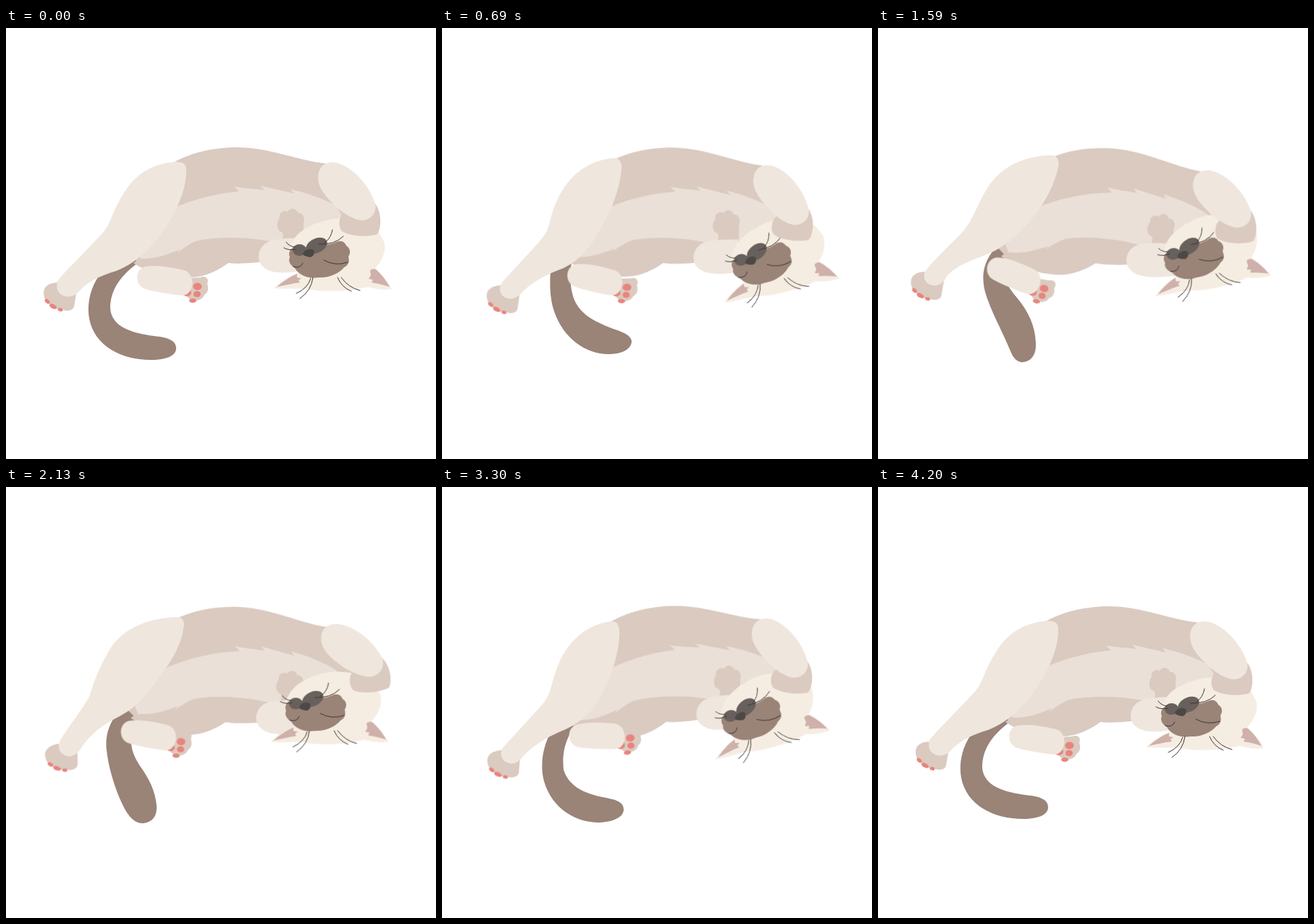
Animation of 594 by 596 pixels, one loop 4230 ms. Source, as an HTML page without scripts:

```html
<!DOCTYPE html>
<html lang="en">
<head>
<meta charset="utf-8">
<title>Sleeping cat</title>
<style>
html, body { margin: 0; width: 100%; height: 100%; overflow: hidden; background: #fff; }
svg { display: block; width: 100vw; height: 100vh; }

.fur { fill: #dacac0; }
.light { fill: #efe6dd; }
.belly { fill: #eae0d7; }
.brown { fill: #9a8377; }
.face { fill: #f6ede2; }
.pink { fill: #e8857d; }
.ear { fill: #cfb0aa; }
.patch { fill: #68605c; }
.nose { fill: #4b4845; }
.line { fill: none; stroke: #3d3936; stroke-width: 1; stroke-linecap: round; }

#tail, #thigh, #body, #foot, #shin, #head, #arm { animation: 4230ms linear infinite; }
#tail { animation-name: tail; }
#thigh { animation-name: thigh; }
#body { animation-name: body; transform-origin: 300px 240px; }
#foot { animation-name: foot; transform-origin: 82px 371px; }
#shin { animation-name: shin; transform-origin: 197px 345px; }
#head { animation-name: head; transform-origin: 451.5px 360px; }
#arm { animation-name: arm; transform-origin: 452px 205px; }

@keyframes tail {
  0%, 99.3%, 100% { d: path("M156,316 C122,338 110,372 115,402 C122,440 160,459 200,459 C224,459 235,452 235,443 C235,432 224,428 205,426 C175,422 146,414 144,388 C144,362 158,342 186,322 Z"); }
  16.31% { d: path("M152,318 C148,345 148,372 155,392 C168,430 200,452 232,451 C253,450 262,442 262,433 C261,424 248,420 234,415 C206,404 190,394 182,374 C177,358 176,345 180,316 Z"); }
  37.59% { d: path("M172,294 C145,318 142,342 148,365 C156,392 170,415 184,449 C188,459 195,463 201,462 C212,460 219,452 218,435 C217,412 208,392 192,373 C176,354 166,338 184,304 Z"); }
  50.35% { d: path("M172,296 C140,320 137,345 139,364 C142,392 153,425 165,447 C173,461 182,466 190,465 C203,463 209,455 208,440 C206,420 198,404 186,387 C174,368 164,350 186,308 Z"); }
  66.67% { d: path("M150,326 C143,358 142,385 149,407 C160,440 190,468 220,467 C234,467 241,460 241,451 C240,442 231,436 219,429 C196,415 182,402 176,385 C172,370 172,352 176,324 Z"); }
  78.01% { d: path("M160,324 C138,352 135,385 141,407 C152,445 185,464 217,464 C238,463 251,456 251,446 C251,436 242,433 228,430 C200,425 176,416 168,391 C166,370 168,348 192,318 Z"); }
}

@keyframes thigh {
  0%, 99.3%, 100% { d: path("M235,185 C244,185 250,188 249,198 C249,225 235,255 217,281 C200,306 178,326 152,336 C128,343 112,352 102,363 C96,370 88,373 82,371 C73,369 68,361 71,350 C82,336 110,309 130,287 C147,270 142,262 163,228 C180,200 205,187 235,185 Z"); }
  16.31% { d: path("M236,180 C245,179 249,185 248,196 C245,225 234,252 221,274 C208,301 192,320 168,332 C147,340 129,348 112,364 C106,372 98,376 91,374 C82,372 77,364 82,353 C95,338 125,307 138,291 C152,275 146,264 161,234 C178,200 205,183 236,180 Z"); }
  37.59% { d: path("M238,176 C247,176 251,181 249,192 C245,214 232,240 214,262 C196,284 175,304 148,314 C125,323 108,329 96,342 C91,352 84,357 76,356 C67,355 62,348 64,338 C76,322 99,300 113,286 C131,268 134,250 150,223 C168,193 200,177 238,176 Z"); }
  50.35% { d: path("M235,180 C244,179 248,186 245,196 C243,215 230,240 213,261 C197,285 182,304 157,317 C133,329 119,340 105,359 C100,369 91,374 84,372 C74,369 70,361 75,350 C86,332 105,308 115,290 C121,272 125,256 143,225 C163,193 200,181 235,180 Z"); }
  66.67% { d: path("M231,184 C240,183 245,190 243,205 C241,232 235,255 226,280 C213,305 197,326 174,339 C152,351 138,358 119,378 C113,388 106,391 100,389 C90,387 86,380 90,370 C104,350 126,320 142,297 C152,284 150,270 164,238 C180,205 203,188 231,184 Z"); }
  78.01% { d: path("M232,186 C242,184 246,191 245,206 C244,232 234,260 222,285 C211,308 194,324 171,335 C150,344 133,352 113,371 C107,380 100,384 93,382 C84,380 79,372 83,362 C97,346 126,315 140,299 C153,283 150,268 164,238 C180,207 204,190 232,186 Z"); animation-timing-function: cubic-bezier(.2, .5, .4, 1); }
}

@keyframes foot {
  0%, 99.3%, 100% { transform: translate(0, 0) rotate(0deg); }
  16.31% { transform: translate(10px, 3.5px) rotate(-2deg); }
  37.59% { transform: translate(-6.5px, -15px) rotate(0deg); }
  50.35% { transform: translate(2.5px, 1px) rotate(-11deg); }
  66.67% { transform: translate(19px, 18px) rotate(-7deg); }
  78.01% { transform: translate(11px, 11px) rotate(-5deg); animation-timing-function: cubic-bezier(.2, .5, .4, 1); }
}

@keyframes shin {
  0%, 99.3%, 100% { transform: translate(0, 0) rotate(0deg); }
  16.31% { transform: translate(-8px, -3px) rotate(3.5deg); }
  37.59% { transform: translate(-30.5px, -12px) rotate(13deg); }
  50.35% { transform: translate(-22.5px, -6.5px) rotate(1deg); }
  66.67% { transform: translate(-10px, -1.5px) rotate(-8deg); }
  78.01% { transform: translate(-5.5px, -1.5px) rotate(-7.5deg); }
}

@keyframes body {
  0%, 99.3%, 100% { transform: rotate(0deg); }
  16.31% { transform: rotate(1.2deg); }
  37.59% { transform: rotate(4.3deg); }
  50.35% { transform: rotate(2.6deg); }
  66.67% { transform: rotate(-2deg); }
  78.01% { transform: rotate(-1.8deg); }
}

@keyframes arm {
  0%, 99.3%, 100% { transform: translate(0, 0) rotate(0deg); }
  16.31% { transform: translate(-1px, 4px) rotate(3.5deg); }
  37.59% { transform: translate(4px, 11px) rotate(-1.3deg); }
  50.35% { transform: translate(4px, 3.5px) rotate(-9.6deg); }
  66.67% { transform: translate(-2px, -5px) rotate(-.7deg); }
  78.01% { transform: translate(-3px, -4px) rotate(2.7deg); }
}

@keyframes head {
  0%, 99.3%, 100% { transform: translate(0, 0) rotate(0deg); }
  16.31% { transform: translate(18px, 2.5px) rotate(-12.4deg); }
  25.8% { transform: translate(22px, 0) rotate(-12.4deg); }
  37.59% { transform: translate(11.5px, -4px) rotate(-10.6deg); }
  50.35% { transform: translate(-4.7px, -8px) rotate(-.5deg); }
  66.67% { transform: translate(-2.5px, -5.5px) rotate(-6.7deg); }
  78.01% { transform: translate(5.3px, -4px) rotate(-14.8deg); }
  89.6% { transform: translate(5px, -3px) rotate(-8deg); }
}
</style>
</head>
<body>
<svg viewBox="0 0 594 596" preserveAspectRatio="none">
  <path id="tail" class="brown" d="M156,316 C122,338 110,372 115,402 C122,440 160,459 200,459 C224,459 235,452 235,443 C235,432 224,428 205,426 C175,422 146,414 144,388 C144,362 158,342 186,322 Z"/>

  <g id="body">
    <path class="fur" d="M228,188 C250,174 285,165 318,165 C365,165 405,184 440,187 L454,194 L486,262 C450,280 400,300 370,322 C345,324 325,327 307,325 C296,333 285,339 270,343 C245,349 205,340 184,330 L176,325 L180,322 L172,315 L200,250 Z"/>
    <path class="belly" d="M215,257 C250,239 285,229 322,226 L315,219 C328,222 342,222 357,224 L351,218 C368,222 382,225 398,229 L393,223 C415,228 440,236 456,246 L466,262 L400,300 L352,293 C320,288 285,290 265,294 C255,297 245,305 236,311 L240,306 C225,313 205,320 186,319 L181,309 L190,280 Z"/>
    <path class="fur" d="M380,300 C383,290 384,285 381,282 C374,281 373,268 378,263 C376,256 384,251 389,254 C394,247 402,250 403,256 C409,254 414,262 411,270 L411,300 Z"/>
    <path class="light" d="M360,297 C372,290 395,291 410,290 L420,334 C400,337 388,339 378,338 C368,338 360,335 355,330 C346,322 347,305 360,297 Z"/>
  </g>

  <g id="shin">
    <path class="fur" d="M250,346 L268,345 C276,342 281,347 278,354 C281,361 278,367 274,369 C272,376 262,378 256,377 L244,366 Z"/>
    <g class="pink">
      <ellipse cx="250" cy="366" rx="6" ry="5"/>
      <ellipse cx="264.5" cy="357.5" rx="6" ry="5"/>
      <ellipse cx="264" cy="368" rx="5" ry="4.3"/>
      <ellipse cx="258" cy="377" rx="5" ry="3"/>
    </g>
    <path class="light" d="M192,330 C210,327 232,332 246,335 C256,338 260,350 256,360 C252,370 245,371 235,369 C220,367 200,364 190,360 C178,354 178,334 192,330 Z"/>
  </g>

  <g id="foot">
    <path class="fur" d="M72,352 C60,352 52,357 52,366 C52,374 56,380 62,383 C66,388 72,389 77,389 C83,392 92,392 94,385 L98,362 Z"/>
    <g class="pink">
      <ellipse cx="57" cy="378" rx="4" ry="2.6" transform="rotate(45 57 378)"/>
      <ellipse cx="65" cy="385" rx="5.5" ry="3" transform="rotate(30 65 385)"/>
      <ellipse cx="75" cy="389.5" rx="3.5" ry="2.4" transform="rotate(15 75 389.5)"/>
    </g>
  </g>
  <path id="thigh" class="light" d="M235,185 C244,185 250,188 249,198 C249,225 235,255 217,281 C200,306 178,326 152,336 C128,343 112,352 102,363 C96,370 88,373 82,371 C73,369 68,361 71,350 C82,336 110,309 130,287 C147,270 142,262 163,228 C180,200 205,187 235,185 Z"/>

  <g id="head">
    <path class="face" d="M390,308 C395,292 405,281 418,275 L432,268 L431,270 C445,264 458,262 470,264 C500,265 517,280 520,292 C525,298 523,305 523,308 C521,318 516,327 510,332 C520,340 528,352 533,361 C522,363 510,361 500,358 C475,364 440,366 418,361 C405,360 388,361 370,360 C380,350 392,343 404,338 C395,332 390,320 390,308 Z"/>
    <path class="ear" d="M503,335 C506,333 509,333 511,334 C519,341 525,349 530,358 C521,355 512,353 505,352 L507,348 L501,347 L504,342 Z"/>
    <path class="ear" d="M374,358 C382,351 392,344 402,340 L402,345 L408,346 L404,349 L406,352 C395,353 385,356 374,358 Z"/>
    <path class="brown" d="M398,303 C391,306 390,312 392,317 C389,323 394,329 399,332 C405,343 420,347 432,345 C446,346 461,339 467,331 C475,327 474,321 473,316 C477,310 475,304 470,301 C467,294 461,294 456,296 C450,299 440,300 430,303 Z"/>
    <ellipse class="patch" cx="405.5" cy="307" rx="9.5" ry="8"/>
    <ellipse class="patch" cx="429" cy="301" rx="15.5" ry="10" transform="rotate(-25 429 301)"/>
    <path class="nose" d="M410,312 C412,307 419,304 425,307 C427,311 425,316 420,317 C415,316 411,315 410,312 Z"/>
    <g class="line">
      <path d="M387,296 Q391,302 399,303"/>
      <path d="M384,304 Q390,308 400,306"/>
      <path d="M451,279 Q449,291 440,297"/>
      <path d="M466,288 Q454,300 432,299"/>
      <path d="M439,321 Q455,330 472,324"/>
      <path d="M397,330 Q407,333 410,325"/>
      <path d="M424,345 Q422,363 406,374"/>
      <path d="M421,346 Q417,360 401,367"/>
      <path d="M458,345 Q464,359 477,364"/>
      <path d="M463,345 Q473,359 489,363"/>
    </g>
  </g>

  <g id="arm">
    <path class="fur" d="M466,256 C459,262 459,276 464,281 C475,288 500,290 513,285 C519,275 519,255 510,243 Z"/>
    <path class="light" d="M432,200 C434,188 447,183 459,187 C480,194 502,217 510,243 C513,256 503,267 490,266 C470,263 445,240 435,222 C431,214 430,207 432,200 Z"/>
  </g>
</svg>
</body>
</html>
```
